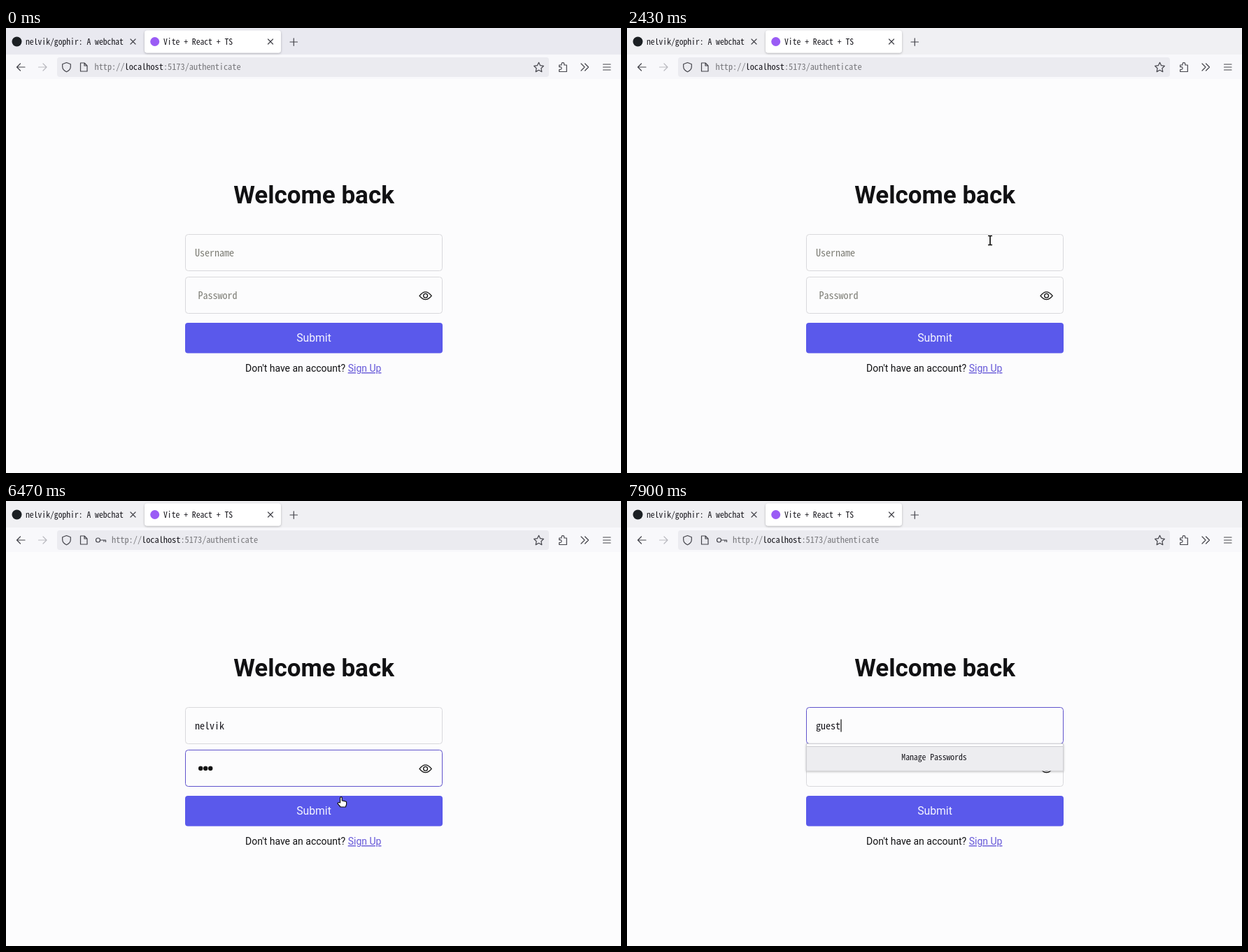
Write an HTML page that moves like this. It is 879 by 637 pixels and loops after 8000 ms.

```html
<!DOCTYPE html>
<html lang="en">
<head>
<meta charset="utf-8">
<title>Login form</title>
<style>
  html, body { margin: 0; width: 100%; height: 100%; overflow: hidden; background: #fcfcfd; }
  svg { display: block; position: absolute; left: 0; top: 0; }
  text { font-family: Roboto, sans-serif; fill: #111113; white-space: pre; }
  /* Monospaced text is sized by the advance of one character. */
  .mono { font-family: "Noto Sans Mono CJK JP", "Noto Sans Mono", monospace; fill: #15141a;
          font-size: calc(var(--advance) / var(--wide, .5)); }
  .tabs { --advance: 5.83px; }
  .url { --advance: 6.15px; }
  .field { --advance: 7px; }
  .dim { fill: #78787c; }
  .hint { fill: #7c7c74; }
  .icon { fill: none; stroke: #44444b; stroke-width: 1.2; stroke-linejoin: round; stroke-linecap: round; }
  .box { fill: #fcfcfd; stroke: #d9d9dc; }
  .box.on { stroke: #6054cc; }
  .cursor { fill: #fff; stroke: #111; stroke-width: 1.2; stroke-linejoin: round; }
</style>
</head>
<body>
<svg width="879" height="637" viewBox="0 0 879 637">
  <defs>
    <filter id="soft" x="-10%" y="-40%" width="120%" height="190%">
      <feDropShadow dx="0" dy="1" stdDeviation="1.5" flood-opacity=".28"/>
    </filter>
  </defs>

  <rect width="879" height="637" fill="#fcfcfd"/>
  <rect id="strip" width="879" height="38"/>
  <rect y="38" width="879" height="35" fill="#f8f8fb"/>
  <rect x="198" y="3.5" width="195" height="32" rx="4" fill="#fff" filter="url(#soft)"/>
  <rect x="73" y="42" width="703" height="28" rx="4" fill="#ebebf0"/>

  <circle cx="15.5" cy="19.5" r="7" fill="#1b1f23"/>
  <text class="mono tabs" x="28" y="24">nelvik/gophir: A webchat</text>
  <circle cx="212.7" cy="19.5" r="6.5" fill="#9a5cf5"/>
  <text class="mono tabs" x="225" y="24">Vite + React + TS</text>

  <g class="icon">
    <path d="M178 16l7 7m0-7l-7 7M374.500 16l7 7m0-7l-7 7M406 20h10.500M411.250 14.800v10.500"/>
    <path d="M27 56H15.500m5-5l-5 5l5 5"/>
    <path d="M46.500 56H58m-5-5l5 5l-5 5" stroke="#b9b9bf"/>
    <path d="M86.500 49.500l5.800 2.300v3.700c0 3-2.300 5.500-5.800 7.200c-3.500-1.700-5.800-4.200-5.800-7.200v-3.700z"/>
    <path d="M106.500 50h5.500l4 4v8h-9.500zM112 50v4h4"/>
    <path d="M761.500 49.300l2.100 4.400l4.800.7l-3.500 3.400l.9 4.800l-4.300-2.300l-4.300 2.300l.9-4.800l-3.500-3.400l4.800-.7z"/>
    <path d="M790.700 53h3.300v-1.500a1.900 1.900 0 0 1 3.800 0V53h3.500v9.500h-10.600v-3h1.500a1.900 1.900 0 0 0 0-3.800h-1.500z"/>
    <path d="M822 51l5 5l-5 5m5.500-10l5 5l-5 5"/>
    <path d="M853.500 52h10.500m-10.500 4h10.500m-10.500 4h10.500"/>
    <g id="key"><circle cx="131.500" cy="56" r="3"/><path d="M134.500 56h8v2.500m-2.500-2.500v2"/></g>
  </g>
  <text id="address" class="mono url dim" x="126.500" y="60.300">http://<tspan fill="#15141a">localhost</tspan>:5173/authenticate</text>

  <text x="440" y="251" font-size="35" font-weight="700" text-anchor="middle">Welcome back</text>

  <rect id="userBox" class="box" x="256.500" y="295.500" width="367" height="52" rx="4"/>
  <rect id="mark" y="312" height="19" fill="#b4d5fe"/>
  <text id="user" class="mono field" x="270" y="326.500"></text>

  <rect id="passBox" class="box" x="256.500" y="356.500" width="367" height="52" rx="4"/>
  <text id="passHint" class="mono field hint" x="274.500" y="388">Password</text>
  <g id="dots" fill="#111"></g>
  <path d="M591 383.300Q599.500 372.500 608.200 383.300Q599.500 394 591 383.300z" fill="none" stroke="#111" stroke-width="1.300" stroke-linejoin="round"/>
  <circle cx="599.600" cy="383.300" r="2.900" fill="none" stroke="#111" stroke-width="1.300"/>
  <rect id="caret" width="1.200" height="18" fill="#111"/>

  <rect id="button" x="256" y="422" width="368" height="43.500" rx="4"/>
  <text x="440" y="449" font-size="15.750" text-anchor="middle" style="fill:#f4f4ff">Submit</text>
  <text x="342" y="492" font-size="14">Don't have an account? <tspan fill="#6557d8" text-decoration="underline">Sign Up</tspan></text>

  <g id="popup">
    <rect x="256.500" y="347.500" width="367" height="38.500" fill="#fcfcfd" stroke="#cfcfd4" filter="url(#soft)"/>
    <rect x="257" y="351" width="366" height="34.500" fill="#ededf0"/>
    <path d="M257 351.500h366" stroke="#cdcdd2"/>
    <text class="mono tabs" x="439" y="371.300" text-anchor="middle">Manage Passwords</text>
  </g>

  <g id="cursor" class="cursor">
    <path id="arrow" d="M0 0V14.500L3.300 11.500L5.600 16.500L8 15.400L5.700 10.500H10z"/>
    <g id="beam" fill="none">
      <path d="M-2.500-6.500H2.500M0-6.500V6.500M-2.500 6.500H2.500" stroke="#fff" stroke-width="4"/>
      <path d="M-3-6.500H3M0-6.500V6.500M-3 6.500H3" stroke-width="1.700"/>
    </g>
    <path id="hand" d="M-1.400 8V.6Q0-1.200 1.300.6V5L3.700 5.300L5.900 5.800L7.600 6.700V10.500L6.300 14H-.8L-5 9.200Q-4.600 7.200-2.800 7.700z"/>
  </g>
</svg>
<script>
const LOOP = 8000;
const $ = id => document.getElementById(id);
const show = (id, on) => { $(id).style.display = on ? '' : 'none'; };
const within = (t, from, to) => t >= from && t < to;

// time, x, y of the pointer's hot spot
const PATHS = [
  [[30, 850, 480], [400, 806, 330], [830, 782, 236], [1000, 779, 229],
   [1350, 690, 204], [1700, 598, 180], [2130, 598, 180], [2430, 519, 303],
   [2650, 480, 440], [2880, 430, 325], [2970, 430, 325], [3180, 410, 480],
   [3430, 506, 323], [3600, 506, 323]],
  [[6000, 506, 323], [6230, 496, 370], [6470, 479, 424], [6560, 475, 442],
   [6680, 466, 428], [6830, 439, 340], [7100, 330, 322], [7180, 330, 322],
   [7420, 184, 322], [7600, 184, 322]]
];
const HOVER = [[0, 0], [2600, 0], [2700, 1], [2750, 1], [2900, 0], [3080, 0], [3160, 1],
               [3300, 1], [3420, 0], [6470, 0], [6600, 1], [6840, 1], [7020, 0], [LOOP, 0]];

const NAME = { text: 'nelvik', keys: [3600, 3800, 3900, 4030, 4150, 4270] };
const SECOND = { text: 'guest', keys: [7600, 7670, 7740, 7810, 7880] };
const SECRET = [5200, 5380, 5570];
const FOCUS = 2900, TAB = 4600, REFOCUS = 7180, RETYPE = SECOND.keys[0];

const count = (keys, t) => keys.filter(k => t >= k).length;
const typed = (word, t) => word.text.slice(0, count(word.keys, t));

// Linear interpolation through rows of [time, ...values]
function sample(rows, t) {
  const i = rows.findIndex((r, n) => n && t < r[0]);
  if (t < rows[0][0] || i < 0) return null;
  const a = rows[i - 1], b = rows[i], p = (t - a[0]) / (b[0] - a[0]);
  return a.slice(1).map((v, n) => v + (b[n + 1] - v) * p);
}

function pointerKind(x, y, popupOpen) {
  const inForm = x > 256 && x < 624;
  if (popupOpen && inForm && within(y, 348, 387)) return 'arrow';
  if (inForm && (within(y, 295, 348) || within(y, 356, 409))) return 'beam';
  const onLink = within(x, 490, 538) && within(y, 479, 496);
  return onLink || (inForm && within(y, 422, 466)) ? 'hand' : 'arrow';
}

function drawPointer(spot, popupOpen) {
  show('cursor', spot);
  if (!spot) return;
  const [x, y] = spot, kind = pointerKind(x, y, popupOpen);
  $('cursor').setAttribute('transform', `translate(${Math.round(x)} ${Math.round(y)})`);
  for (const id of ['arrow', 'beam', 'hand']) show(id, id === kind);
}

function drawCaret(t, letters, dots, selecting) {
  const onPass = within(t, TAB, REFOCUS);
  const last = Math.max(...[FOCUS, TAB, REFOCUS, ...NAME.keys, ...SECRET, ...SECOND.keys].filter(k => k <= t));
  const lit = t >= FOCUS && (t - last) % 1000 < 500 && !within(t, 6070, REFOCUS);
  show('caret', lit && !selecting);
  $('caret').setAttribute('x', onPass ? 275 + dots * 7 : 270.4 + letters * 7);
  $('caret').setAttribute('y', onPass ? 374 : 312.5);
}

function draw(t) {
  const spot = sample(PATHS[0], t) || sample(PATHS[1], t);
  const popupOpen = within(t, FOCUS, 3900) || t >= REFOCUS;
  const value = t < RETYPE ? typed(NAME, t) : typed(SECOND, t);
  const dots = count(SECRET, t);
  const selecting = within(t, REFOCUS, RETYPE);

  $('strip').setAttribute('fill', t < 1650 ? '#e9e9f0' : '#f0f0f3');
  $('user').textContent = value || 'Username';
  $('user').classList.toggle('hint', !value);
  $('userBox').classList.toggle('on', within(t, FOCUS, TAB) || t >= REFOCUS);
  $('passBox').classList.toggle('on', within(t, TAB, REFOCUS));

  show('mark', selecting);
  if (selecting) {
    const left = Math.min(312, Math.max(270, spot[0]));
    $('mark').setAttribute('x', left);
    $('mark').setAttribute('width', 312 - left);
  }

  show('passHint', !dots);
  [...$('dots').children].forEach((dot, i) => { dot.style.display = i < dots ? '' : 'none'; });
  show('key', dots);
  $('address').setAttribute('x', dots ? 151 : 126.5);

  const h = sample(HOVER, t)[0];
  $('button').setAttribute('fill', `rgb(${90 + 16 * h},${89 + 16 * h},${235 + 5 * h})`);
  show('popup', popupOpen);
  drawCaret(t, value.length, dots, selecting);
  drawPointer(spot, popupOpen);
}

const pen = document.createElement('canvas').getContext('2d');
pen.font = '100px "Noto Sans Mono CJK JP", "Noto Sans Mono", monospace';
document.documentElement.style.setProperty('--wide', pen.measureText('0').width / 100);
$('dots').innerHTML = SECRET.map((_, i) => `<circle cx="${278.2 + 7 * i}" cy="382.700" r="3.200"/>`).join('');

const start = performance.now();
function tick() {
  draw((performance.now() - start) % LOOP);
  requestAnimationFrame(tick);
}
tick();
</script>
</body>
</html>
```
